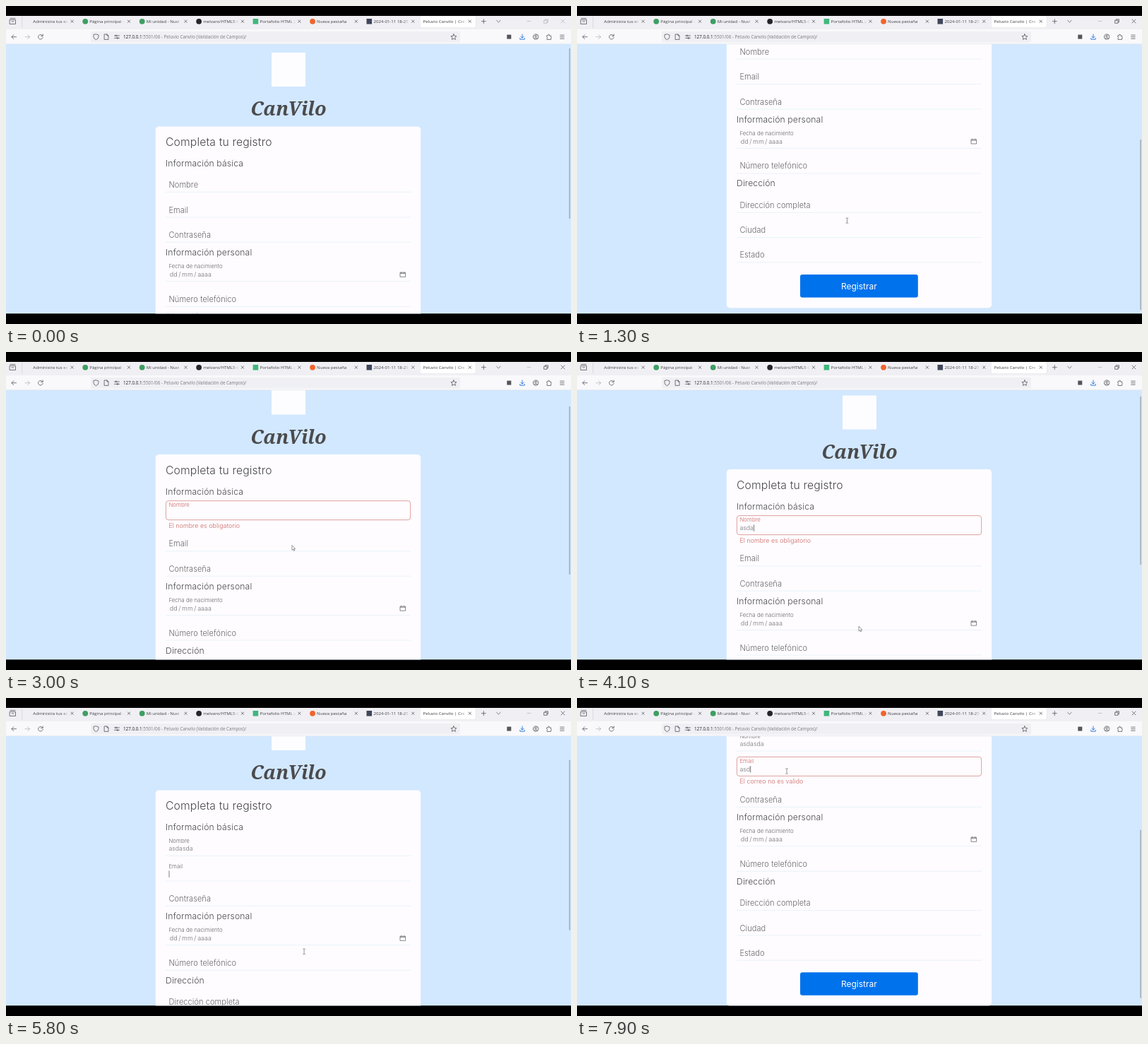
Write an HTML page that moves like this. It is 800 by 450 pixels and loops after 8 s.

```html
<!DOCTYPE html>
<html lang="es">
<head>
<meta charset="utf-8">
<title>Registro</title>
<style>
  html, body { margin: 0; width: 100%; height: 100%; overflow: hidden; background: #000; }
  svg { display: block; width: 800px; height: 450px; }
  text { white-space: pre; }
  .page text { font-family: Inter, "Open Sans", sans-serif; font-weight: 300; fill: #666; }
  .page .title { font-size: 15.7px; fill: #484848; letter-spacing: .14px; }
  .page .head { font-size: 12.2px; fill: #484848; letter-spacing: .13px; }
  .page .label { font-size: 11px; letter-spacing: .08px; }
  .page .small { font-size: 7.8px; letter-spacing: .05px; }
  .page .value { font-size: 8.8px; fill: #757575; }
  .page .date { font-size: 9px; word-spacing: -.9px; }
  .page .error { font-size: 8.8px; fill: #cc6560; letter-spacing: .08px; }
  .page .bad { fill: #cc6560; }
  .page .btn { font-size: 12px; font-weight: 400; fill: #fff; text-anchor: middle; }
  .page .brand { font: italic 700 27px "Noto Serif", serif; fill: #4b4b4d; text-anchor: middle; }
  .chrome text { font: 6.1px "Open Sans", "Noto Sans", sans-serif; fill: #3f3f45; }
  .chrome .url { font-size: 6.3px; fill: #77777d; }
  .ico { fill: none; stroke: #55555c; stroke-width: .8; stroke-linecap: round; stroke-linejoin: round; }
</style>
</head>
<body>
<svg viewBox="0 0 800 450">
  <defs>
    <clipPath id="view"><rect y="54" width="800" height="381.3"/></clipPath>
    <linearGradient id="fade"><stop offset="0" stop-color="#f0f0f4" stop-opacity="0"/><stop offset="1" stop-color="#f0f0f4"/></linearGradient>
    <linearGradient id="fadeOn"><stop offset="0" stop-color="#fff" stop-opacity="0"/><stop offset="1" stop-color="#fff"/></linearGradient>
  </defs>
  <rect width="800" height="450"/>
  <g class="page" clip-path="url(#view)">
    <rect y="54" width="800" height="382" fill="#d2e8ff"/>
    <g id="doc">
      <rect x="376" y="66" width="48" height="48" fill="#fdfdff"/>
      <text class="brand" x="400" y="155">CanVilo</text>
      <rect id="shade" x="211.7" y="171.2" width="375.5" rx="5.5" fill="#c8ddf5"/>
      <rect id="card" x="211.7" y="170.6" width="375.5" rx="5" fill="#fefcff"/>
      <text class="title" x="226" y="198">Completa tu registro</text>
      <text class="head" x="226" y="227">Información básica</text>
      <g id="name"></g>
      <g id="mail"></g>
      <g id="rest"></g>
    </g>
    <rect id="thumb" x="797.5" width="1.1" rx=".5" fill="#8a929c"/>
  </g>
  <g class="chrome" id="chrome"></g>
  <g id="cursor">
    <path id="beam" d="M-1.8-3.6H-.5L0-3.2.5-3.6H1.8M0-3.2V3.2M-1.8 3.6H-.5L0 3.2.5 3.6H1.8" fill="none" stroke="#666" stroke-width=".7"/>
    <path id="arrow" d="M-1-4V3L.6 1.6 1.7 4 2.7 3.5 1.7 1.2H3.8Z" fill="#fff" stroke="#555" stroke-width=".6"/>
    <path id="hand" d="M-1-4Q0-4.6.4-3.6V-.9L3-.3Q3.6 0 3.3 1.6L2.6 4H-.8L-2.8.8Q-2.4 0-1 .8Z" fill="#fff" stroke="#222" stroke-width=".7"/>
  </g>
</svg>
<script>
const LOOP = 8000, ERR = 8.3, MAX = 188.3;
const $ = id => document.getElementById(id);
const set = (el, attrs) => { for (const k in attrs) el.setAttribute(k, attrs[k]); };
const text = (cls, x, y, s) => `<text class="${cls}" x="${x}" y="${y}">${s}</text>`;
const rule = y => `<path d="M226 ${y}H573" stroke="#e2f0f6" stroke-width=".8"/>`;
const ico = (d, extra = '') => `<path class="ico" d="${d}" ${extra}/>`;

// Browser frame
const tabs = [
  ['Administra tus ex'],
  ['Página principal -', '#3f9e62', 'round'],
  ['Mi unidad - Nuvi', '#3f9e62', 'round'],
  ['melvaro/HTML5-CS', '#24252a', 'round'],
  ['Portafolio HTML y', '#3fb77c', 'square'],
  ['Nueva pestaña', '#f0642c', 'round'],
  ['2024-01-11 18-25', '#40465a', 'square'],
  ['Peluvio Canvilo | Cre']
];

function tab([title, color, shape], i) {
  const close = 93.6 + 80.45 * i, on = i === 7;
  const x = on ? 590.5 : i ? close - 55.8 : 38.3;
  const mark = !color ? '' : shape === 'round'
    ? `<circle cx="${x - 6}" cy="21.8" r="3.9" fill="${color}"/>`
    : `<rect x="${x - 10}" y="18" width="7.6" height="7.6" fill="${color}"/>`;
  const back = on ? '<rect x="586" y="14" width="79.5" height="17" rx="2" fill="#dedee4"/><rect x="586.5" y="14" width="78.5" height="16.5" rx="1.8" fill="#fff"/>' : '';
  return back + mark + text('', x, 24, title)
    + `<rect x="${close - 14}" y="16" width="9" height="12" fill="url(#${on ? 'fadeOn' : 'fade'})"/>`
    + `<rect x="${close - 5}" y="16" width="9" height="12" fill="${on ? '#fff' : '#f0f0f4'}"/>`
    + ico(`M${close - 1.7} 20l3.4 3.4m0-3.4l-3.4 3.4`);
}

$('chrome').innerHTML = `
  <rect y="14" width="800" height="19.5" fill="#f0f0f4"/>
  <rect y="33" width="800" height="21" fill="#f9f9fb"/>
  <path d="M0 53.7H800" stroke="#dcdfe6" stroke-width=".6"/>
  <rect x="120" y="36" width="523" height="15.5" rx="2" fill="#f0f0f4"/>
  <path d="M22.7 15V31" stroke="#cfcfd6" stroke-width=".7"/>`
  + ico('M6 17.5H13M5.5 19.5H13.5V25.5H5.5ZM8 22H11')
  + tabs.map(tab).join('')
  + ico('M673.3 21.7H679.3M676.3 18.7V24.7M694.7 20.4L697.4 23 700.1 20.4')
  + ico('M738 21.5H743', 'opacity=".35"')
  + ico('M762 20.3H766V24.3H762ZM763.4 20V18.8H767.4V22.8H766.3M786 19L791 24M791 19L786 24', 'id="controls"')
  + ico('M14.5 43.7H8M10.8 40.8L8 43.7 10.8 46.6')
  + ico('M27 43.7H33.5M30.7 40.8L33.5 43.7 30.7 46.6', 'opacity=".4"')
  + ico('M51.6 41.8A3.3 3.3 0 1 0 52.2 44.4M52.2 40V42.5H49.7')
  + ico('M127.5 39.8L131 41V43.5Q130.8 46.4 127.5 47.8 124.2 46.4 124 43.5V41Z')
  + ico('M139.5 40H143L145 42V47.4H139.5ZM143 40V42H145')
  + ico('M153.5 42H155M157 42H160.5M153.5 45.4H157M159 45.4H160.5M155 42a1 1 0 1 0 2 0a1 1 0 1 0-2 0M157 45.4a1 1 0 1 0 2 0a1 1 0 1 0-2 0')
  + ico('M633.9 39.8L635.1 42.4 637.9 42.7 635.8 44.6 636.4 47.4 633.9 46 631.4 47.4 632 44.6 629.9 42.7 632.7 42.4Z')
  + '<rect x="709.3" y="40.6" width="6" height="6" fill="#55555c"/>'
  + ico('M731 40V45M728.8 43L731 45.2 733.2 43M727.8 45.4V47.2H734.2V45.4', 'style="stroke:#0b62dc"')
  + ico('M746.5 43.6a3.7 3.7 0 1 0 7.4 0a3.7 3.7 0 1 0-7.4 0M748.9 42.6a1.3 1.3 0 1 0 2.6 0a1.3 1.3 0 1 0-2.6 0M748 45.8Q750.2 44.2 752.4 45.8')
  + ico('M766 42H767.6V40.6Q768.5 39.4 769.4 40.6V42H771.6V44Q773 44.6 771.6 46V47.4H766V45.6Q767.4 44.8 766 43.8Z')
  + ico('M784.7 41.2H790.2M784.7 43.7H790.2M784.7 46.2H790.2')
  + `<text class="url" x="166" y="46"><tspan fill="#222226">127.0.0.1</tspan>:5501/06 - Peluvio Canvilo (Validación de Campos)/</text>`;

// Form fields below the two that change
const plain = (y, s) => text('label', 230.4, y - 6.4, s) + rule(y);
$('rest').innerHTML = plain(334.3, 'Contraseña')
  + text('head', 226, 353, 'Información personal')
  + text('small', 230.4, 371.2, 'Fecha de nacimiento')
  + text('value date', 231.8, 383, 'dd / mm / aaaa') + rule(389.7)
  + '<path d="M558 377.2H565.6V383.3H558ZM558 378.4H565.6M559.7 376V377.5M563.9 376V377.5" fill="none" stroke="#6a6a6a" stroke-width=".8"/>'
  + plain(425.2, 'Número telefónico')
  + text('head', 226, 443.8, 'Dirección')
  + plain(480.6, 'Dirección completa') + plain(515.9, 'Ciudad') + plain(551.2, 'Estado')
  + '<rect x="316" y="568.2" width="166.8" height="32.6" rx="3" fill="#0072ec"/>'
  + text('btn', 399.3, 589, 'Registrar');

function liveField(id, y, label, message) {
  $(id).innerHTML = rule(y)
    + `<rect x="226.4" y="${y - 27.2}" width="346.2" height="27" rx="3.5" fill="none" stroke="#d98a86" stroke-width=".8"/>`
    + text('label', 230.4, y - 6.4, label) + text('small', 230.4, y - 18.4, label)
    + text('value', 230.4, y - 6.9, '') + text('error', 230.4, y + 10.8, message)
    + `<path d="M0 ${y - 14.4}V${y - 5}" stroke="#444" stroke-width=".7"/>`;
  const [line, box, big, small, value, error, caret] = $(id).children;
  const show = (el, on) => { el.style.display = on ? '' : 'none'; };
  return ({ focus, typed, bad }) => {
    const raised = focus || typed || bad;
    show(line, !bad); show(box, bad); show(error, bad);
    show(big, !raised); show(small, raised); show(caret, focus);
    small.classList.toggle('bad', bad);
    if (value.textContent !== typed) value.textContent = typed;
    const w = typed ? value.getComputedTextLength() : 0;
    set(caret, { transform: `translate(${231 + w})` });
  };
}
const drawName = liveField('name', 263.3, 'Nombre', 'El nombre es obligatorio');
const drawMail = liveField('mail', 298.9, 'Email', 'El correo no es valido');

// Motion: [time, value...]
const scrollPath = [[0, 0], [100, 0], [450, MAX], [2000, MAX], [2350, 4.5], [2880, 4.5], [3000, 24.7],
  [3220, MAX + ERR], [3360, MAX + ERR], [3640, 4.5], [4580, 4.5], [4860, MAX + ERR], [5449, MAX + ERR],
  [5450, MAX], [5800, 40], [6700, 40], [6800, 77.5], [7020, MAX]];
const mousePath = [[100, 379, 300], [600, 379, 280], [1200, 379, 280], [1700, 396, 397], [2100, 396, 397],
  [2600, 406, 277], [3000, 406, 277], [3280, 400, 392], [4600, 400, 392], [4900, 418.5, 340],
  [5300, 402, 395], [5550, 402, 395], [6000, 438, 330], [7000, 438, 330], [7250, 400, 402],
  [7400, 400, 402], [7900, 297, 103.5]];
const mouseKind = [[0, ''], [100, 'beam'], [1600, 'hand'], [2100, 'arrow'], [3250, 'hand'], [3500, 'arrow'],
  [4700, 'beam'], [5250, 'hand'], [5700, 'beam'], [7200, 'hand'], [7550, 'beam']];

function along(path, t) {
  const i = path.findIndex(p => p[0] > t);
  if (i < 0) return path.at(-1).slice(1);
  if (!i) return path[0].slice(1);
  const a = path[i - 1], b = path[i], k = (t - a[0]) / (b[0] - a[0]);
  return a.slice(1).map((v, j) => v + (b[j + 1] - v) * k);
}
const within = (t, a, b) => t >= a && t < b;
const typing = (s, t, start, step) => s.slice(0, Math.max(0, Math.floor((t - start) / step) + 1));

function draw(t) {
  const nameBad = within(t, 2700, 5450), mailBad = t >= 7350;
  drawName({ focus: within(t, 2000, 2700) || within(t, 3330, 5450), typed: typing('asdasda', t, 3750, 100), bad: nameBad });
  drawMail({ focus: t >= 5450, typed: typing('asd', t, 6150, 150), bad: mailBad });

  const up = nameBad ? ERR : 0, shift = up + (mailBad ? ERR : 0);
  const [scroll] = along(scrollPath, t);
  set($('mail'), { transform: `translate(0 ${up})` });
  set($('rest'), { transform: `translate(0 ${shift})` });
  set($('card'), { height: 445.1 + shift });
  set($('shade'), { height: 445.1 + shift });
  set($('doc'), { transform: `translate(0 ${-scroll})` });
  const size = shift ? 238 : 241;
  set($('thumb'), { y: 60 + (370 - size) * scroll / (MAX + shift), height: size });

  // The window is inactive until the pointer arrives
  set($('controls'), { opacity: t < 100 ? .35 : 1 });
  const kind = mouseKind.findLast(k => k[0] <= t)[1];
  for (const id of ['beam', 'arrow', 'hand']) $(id).style.display = id === kind ? '' : 'none';
  set($('cursor'), { transform: `translate(${along(mousePath, t)})` });
}

const start = performance.now();
function tick() {
  draw((performance.now() - start) % LOOP);
  requestAnimationFrame(tick);
}
tick();
</script>
</body>
</html>
```
